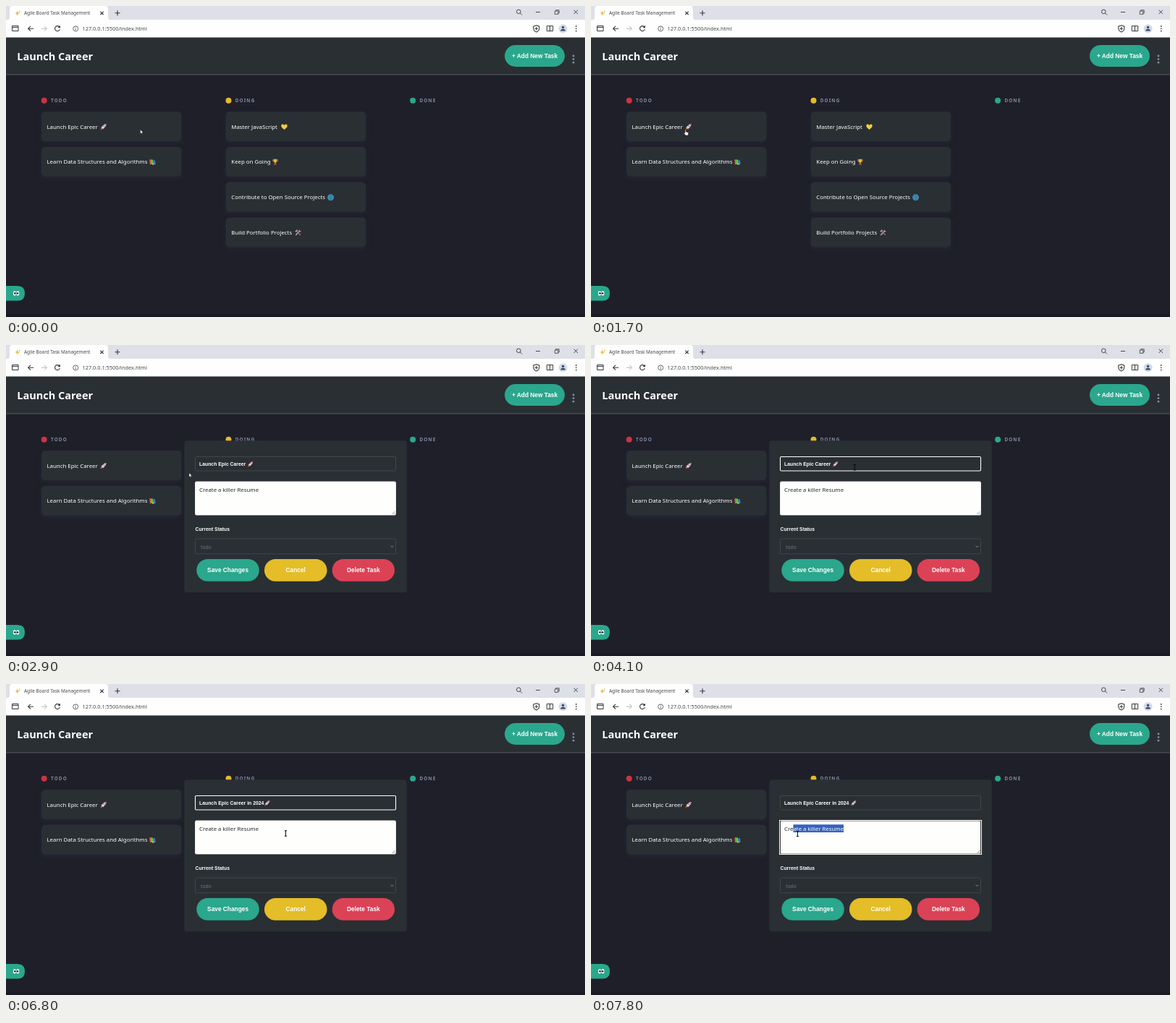
An HTML page for the animation above (8 s loop, 800 px wide and 430 px high).

```html
<!DOCTYPE html>
<html lang="en">
<head>
<meta charset="utf-8">
<title>Agile Board</title>
<style>
  html, body { margin: 0; width: 100%; height: 100%; overflow: hidden; background: #1f1f2a; }
  svg { display: block; width: 800px; height: 430px; }
  text { font-family: "Noto Sans", sans-serif; white-space: pre; }
  .b { font-family: "Liberation Sans", Arial, sans-serif; font-weight: bold; }
  .line { fill: none; stroke: #42454a; stroke-width: 1; }
  .card { fill: #2a2f34; filter: drop-shadow(0 3px 3px #262a3899); }
</style>
</head>
<body>
<svg id="stage" viewBox="0 0 800 430" xmlns="http://www.w3.org/2000/svg"></svg>
<script>
const GREEN = '#2aa78c', YELLOW = '#e4bd28', RED = '#dc4255', PANEL = '#2a2f34';

const text = (x, y, str, size, fill = '#fff', attrs = '') =>
  `<text x="${x}" y="${y}" font-size="${size}" fill="${fill}" ${attrs}>${str}</text>`;
const rect = (x, y, w, h, fill, r = 0, attrs = '') =>
  `<rect x="${x}" y="${y}" width="${w}" height="${h}" rx="${r}" fill="${fill}" ${attrs}/>`;
const dot = (x, y, r, fill) => `<circle cx="${x}" cy="${y}" r="${r}" fill="${fill}"/>`;
const path = (d, attrs = 'class="line"') => `<path d="${d}" ${attrs}/>`;
const fillPath = (d, fill) => path(d, `fill="${fill}"`);
const strokePath = (d, stroke, w = 1) => path(d, `fill="none" stroke="${stroke}" stroke-width="${w}"`);
const at = (x, y, body, attrs = '') => `<g transform="translate(${x} ${y})" ${attrs}>${body}</g>`;
const pill = (x, y, w, h, fill, label) => rect(x, y, w, h, fill, h / 2) +
  text(x + w / 2, y + h / 2 + 3, label, 8.33, '#fff', 'class="b" text-anchor="middle"');

// Icons are centred on 0,0 and about 8px wide
const icons = {
  rocket: fillPath('M-2.6 -.6L-4 1.2L-1.6 1.4ZM.8 2.6L-.8 4L-1.2 1.6Z', '#d4374c') +
    fillPath('M4 -4Q.6 -4 -2.8 .8L-.7 2.9Q4 -.4 4 -4Z', '#e4d5dc') +
    fillPath('M4 -4L1.7 -3.3L3.4 -1.6Z', '#dc4255') + dot(.8, -.8, .9, '#4d78a8') +
    fillPath('M-2.7 1.4L-4 4L-1.4 2.8Z', '#f2a93b'),
  books: fillPath('M-4.2 -3.4L-1.8 -4L-1 2.6L-3.4 3.4Z', '#d8543f') +
    rect(-2.2, -3.4, 3.2, 6.4, '#63c53a', .4) + fillPath('M.6 -2L3.6 -2.6L4.4 3L1.4 3.8Z', '#3b7bd0') +
    fillPath('M-.4 2L2 1.6L2 3.6L-.2 3.8Z', '#e6c440'),
  heart: fillPath('M0 4C-3 1.8 -4.4 0 -4.2 -1.7C-4 -4 -1 -4.2 0 -2C1 -4.2 4 -4 4.2 -1.7C4.4 0 3 1.8 0 4Z', '#f0cf3e'),
  trophy: strokePath('M-2 -3H-3.5Q-3.4 -.6 -1.4 -.2M2 -3H3.5Q3.4 -.6 1.4 -.2', '#d39a2b', .8) +
    fillPath('M-2.3 -4H2.3Q2.2 .3 .6 .9V2.4H-.6V.9Q-2.2 .3 -2.3 -4Z', '#e9b63c') + rect(-2, 2.2, 4, 1.7, '#8a5a35', .3),
  globe: dot(0, 0, 4.3, '#4ba0c8') +
    strokePath('M-4.2 0H4.2M0 -4.2V4.2M-3.4 -2.2H3.4M-3.4 2.2H3.4M0 -4.2Q-4 0 0 4.2Q4 0 0 -4.2', '#246c91', .6),
  tools: strokePath('M-3.2 3.4L2.6 -2.6', '#a9b3bd', 1.5) + strokePath('M3.4 3.4L-1.6 -1.8', '#b8604c', 1.5) +
    strokePath('M-3.6 -1.2L-.8 -3.8', '#9ba6b2', 1.8) + strokePath('M1.6 -3.6Q1.8 -1.4 4 -1.6', '#a9b3bd', 1.1),
};
const icon = (name, x, y, attrs) => at(x, y, icons[name], attrs);

function browser() {
  const ink = '#34373c';
  return rect(0, 0, 800, 20, '#dde0e6') + rect(0, 19, 800, 24.5, '#fefefe') +
    fillPath('M1 19.5Q5 19.5 5 15V4Q5 0 9 0H137Q141 0 141 4V15Q141 19.5 145 19.5Z', '#fefefe') +
    fillPath('M15.5 6.5L16.6 9L19.5 10L16.6 11L15.5 13.5L14.6 11L12.6 10L14.6 9ZM18.8 6L19.3 7.2L20.5 7.6L19.3 8L18.8 9.2L18.3 8L17.2 7.6L18.3 7.2Z', '#f0bb45') +
    text(25, 12.2, 'Agile Board Task Management', 6.4, '#44474c') +
    strokePath('M130.3 7.6L134.7 12M134.7 7.6L130.3 12M150.5 9.8H157.5M154 6.3V13.3', ink, 1.1) +
    `<circle cx="708.3" cy="7.8" r="2.8" class="line"/>` +
    strokePath('M710.4 9.9L713 12.5M732 8.5H738M784.6 5.6L790 11M790 5.6L784.6 11', ink, .9) +
    strokePath('M758.3 7H762.8V11.4H758.3ZM759.7 7V5.7H764.2V10H762.8', ink, .8) +
    strokePath('M8.5 27.5H17V34.5H8.5ZM8.5 29.5H17', ink) +
    strokePath('M38 31.2H30.8M34 27.8L30.6 31.2L34 34.6', ink, 1.1) +
    strokePath('M49 31.2H56M53 27.8L56.4 31.2L53 34.6', '#b4b6ba') +
    strokePath('M74 29.2A3.5 3.5 0 1 0 74.4 32.1M74.4 27.2V29.8H71.8', ink, 1.1) +
    `<circle cx="96.2" cy="31.4" r="3.5" class="line" style="stroke-width:.8"/>` +
    strokePath('M96.2 30.8V33.4M96.2 29.2V30', ink, .8) +
    text(105.5, 34, '127.0.0.1:5500/index.html', 7.35, '#44474c') +
    strokePath('M732.8 26.8L736.8 28.2V31Q736.6 34.4 732.8 36Q729 34.4 728.8 31V28.2ZM732.8 29V33.6M730.6 31.2H735', ink, 1.1) +
    strokePath('M747.3 27.6H755.7V34.6H747.3ZM751.5 27.6V34.6', ink) +
    dot(769.6, 31.2, 6, '#d3daea') + dot(769.6, 29.5, 1.7, '#3b4a68') +
    fillPath('M766.2 34.4Q766.4 31.8 769.6 31.8Q772.8 31.8 773 34.4Z', '#3b4a68') +
    [28, 31.3, 34.6].map(y => dot(787.8, y, .9, ink)).join('');
}

function column(x, color, name, cards = []) {
  return dot(x + 3.7, 130.8, 4, color) +
    text(x + 13, 133.2, name, 6.3, '#828fa3', 'font-weight="bold" letter-spacing="1.15"') +
    cards.map(([label, name, iconX], i) => {
      const y = 146 + i * 48.8;
      return rect(x, y, 193.3, 41, PANEL, 5, 'class="card"') +
        text(x + 7.5, y + 23.6, label, 7.83) + icon(name, iconX, y + 21);
    }).join('');
}

const board = rect(0, 43.5, 800, 387, '#1f1f2a') + rect(0, 426, 800, 4, '#1a1a24') +
  rect(0, 43.5, 800, 51, PANEL) + rect(0, 94.3, 800, 1.1, '#555c60') +
  text(15.3, 75, 'Launch Career', 14.5, '#fff', 'font-weight="bold"') +
  pill(689, 54, 83, 30, GREEN, '+ Add New Task') +
  [69, 73.6, 78.2].map(y => dot(784, y, 1.4, '#828fa3')).join('') +
  column(49, '#cb3441', 'TODO', [
    ['Launch Epic Career', 'rocket', 134.6],
    ['Learn Data Structures and Algorithms', 'books', 202.3]]) +
  column(303.8, '#e6b92b', 'DOING', [
    ['Master JavaScript', 'heart', 384.5],
    ['Keep on Going', 'trophy', 372],
    ['Contribute to Open Source Projects', 'globe', 448.6],
    ['Build Portfolio Projects', 'tools', 403.5]]) +
  column(558.4, GREEN, 'DONE') +
  fillPath('M0 387H16Q26 387 26 397.3Q26 407.6 16 407.6H0Z', GREEN) +
  rect(10, 394, 3.8, 6.4, '#fff', 1.9) + rect(14.4, 394, 3.8, 6.4, '#fff', 1.9) +
  dot(12.3, 397.3, 1.3, '#222') + dot(15.9, 397.3, 1.3, '#222');

const modal = rect(246.3, 132.3, 307.5, 210, PANEL, 4) +
  rect(261.5, 154.5, 277, 19.5, 'none', 1.5, 'id="field"') +
  text(267, 167.2, '', 6.85, '#fff', 'id="title" class="b"') +
  icon('rocket', 0, 0, 'id="rocket"') + rect(0, 160.5, .7, 8, '#fff', 0, 'id="caret"') +
  rect(261.5, 189, 277, 46, '#fefefc', 1.5, 'id="area"') +
  rect(0, 194.3, 0, 10.8, '#3562c0', 0, 'id="mark"') +
  text(267, 202.6, '<tspan id="plain"></tspan><tspan id="picked" fill="#fff"></tspan>', 7.83, '#25282c') +
  strokePath('M533.5 234L537.5 230M535.8 234L537.5 232.3', '#555', .6) +
  text(261.5, 257, 'Current Status', 6.85, '#fff', 'class="b"') +
  rect(261.5, 268, 277, 20.8, 'none', 1.5, 'class="line"') + text(269, 281.5, 'todo', 6.85, '#6f757b') +
  strokePath('M531.6 277.7L533.5 279.6L535.4 277.7', '#8d9297') +
  pill(263.3, 296, 86.5, 30.8, GREEN, 'Save Changes') +
  pill(357, 296, 86.5, 30.8, YELLOW, 'Cancel') +
  pill(450.7, 296, 86.3, 30.8, RED, 'Delete Task');

const pointers = {
  arrow: path('M0 0V5.4L1.3 4.3L2.1 6L3.1 5.5L2.3 3.9L3.9 3.7Z', 'fill="#fff" stroke="#111" stroke-width=".4"'),
  hand: path('M0 .5Q.7 -.3 1.3 .5V3L4 3.6Q5 4 4.7 5.3L4 8H.8L-1.7 5Q-1.5 3.9 -.2 4.7Z',
    'fill="#fff" stroke="#111" stroke-width=".6"'),
  beam: strokePath('M-1.7 -3.7H1.7M-1.7 3.7H1.7M0 -3.7V3.7', '#0b0b0d', 1),
};

stage.innerHTML = board + browser() + `<g id="modal">${modal}</g>` +
  Object.keys(pointers).map(k => at(0, 0, pointers[k], `id="${k}"`)).join('');

const $ = id => document.getElementById(id);
const set = (id, attrs) => { for (const k in attrs) $(id).setAttribute(k, attrs[k]); };
const show = (id, on) => set(id, { visibility: on ? 'inherit' : 'hidden' });
const latest = (keys, t) => keys.filter(k => k[0] <= t).pop();

// time, x, y, pointer
const mouse = [
  [0, 185.5, 171, 'arrow'], [500, 183, 172, 'hand'], [600, 178, 173, 'hand'], [800, 171, 173, 'hand'],
  [900, 163, 173, 'hand'], [1000, 156, 172, 'hand'], [1500, 149, 171, 'hand'], [1600, 138, 171, 'hand'],
  [1700, 130, 171, 'hand'], [2600, 150, 172, 'hand'], [2800, 198, 174, 'hand'], [2900, 253, 177, 'arrow'],
  [3100, 295, 179, 'arrow'], [3300, 326, 178, 'arrow'], [3500, 350, 172, 'beam'], [3600, 364.3, 169.3, 'beam'],
  [6600, 369, 182, 'arrow'], [6700, 379, 197, 'beam'], [6800, 386.5, 206.5, 'beam'], [7200, 372, 206.5, 'beam'],
  [7600, 345, 206.5, 'beam'], [7700, 312, 206.5, 'beam'], [7800, 285.5, 207, 'beam']];
const typed = 'in 2024 ', keyTimes = [4500, 4600, 4900, 5100, 5200, 5800, 6100, 7100];
const note = 'Create a killer Resume';
const picks = [[0, note.length], [7600, 19], [7700, 11], [7800, 3]];

function draw(t) {
  const [, x, y, kind] = latest(mouse, t);
  for (const k in pointers) show(k, k === kind);
  set(kind, { transform: `translate(${x} ${y})` });

  show('modal', t >= 2100);
  $('title').textContent = 'Launch Epic Career ' + typed.slice(0, keyTimes.filter(k => k <= t).length);
  const end = 267 + $('title').getComputedTextLength();
  set('rocket', { transform: `translate(${end + 4.4} 164.8) scale(.88)` });
  set('caret', { x: end });
  show('caret', t >= 4500 && t < 6300 && t >= 2100);

  const editing = t >= 4000 && t < 7200;
  set('field', { stroke: editing ? '#fff' : '#42454a', 'stroke-width': editing ? 1.1 : 1 });
  set('area', { stroke: t >= 7200 ? '#111' : '#fefefc', 'stroke-width': .8 });
  $('area').style.outline = t >= 7200 ? '.8px solid #fff' : 'none';

  const from = latest(picks, t)[1];
  $('plain').textContent = note.slice(0, from);
  $('picked').textContent = note.slice(from);
  const left = $('plain').getComputedTextLength();
  set('mark', { x: 267 + left, width: $('picked').getComputedTextLength() });
}

const start = performance.now();
function loop() {
  draw((performance.now() - start) % 8000);
  requestAnimationFrame(loop);
}
loop();
</script>
</body>
</html>
```
